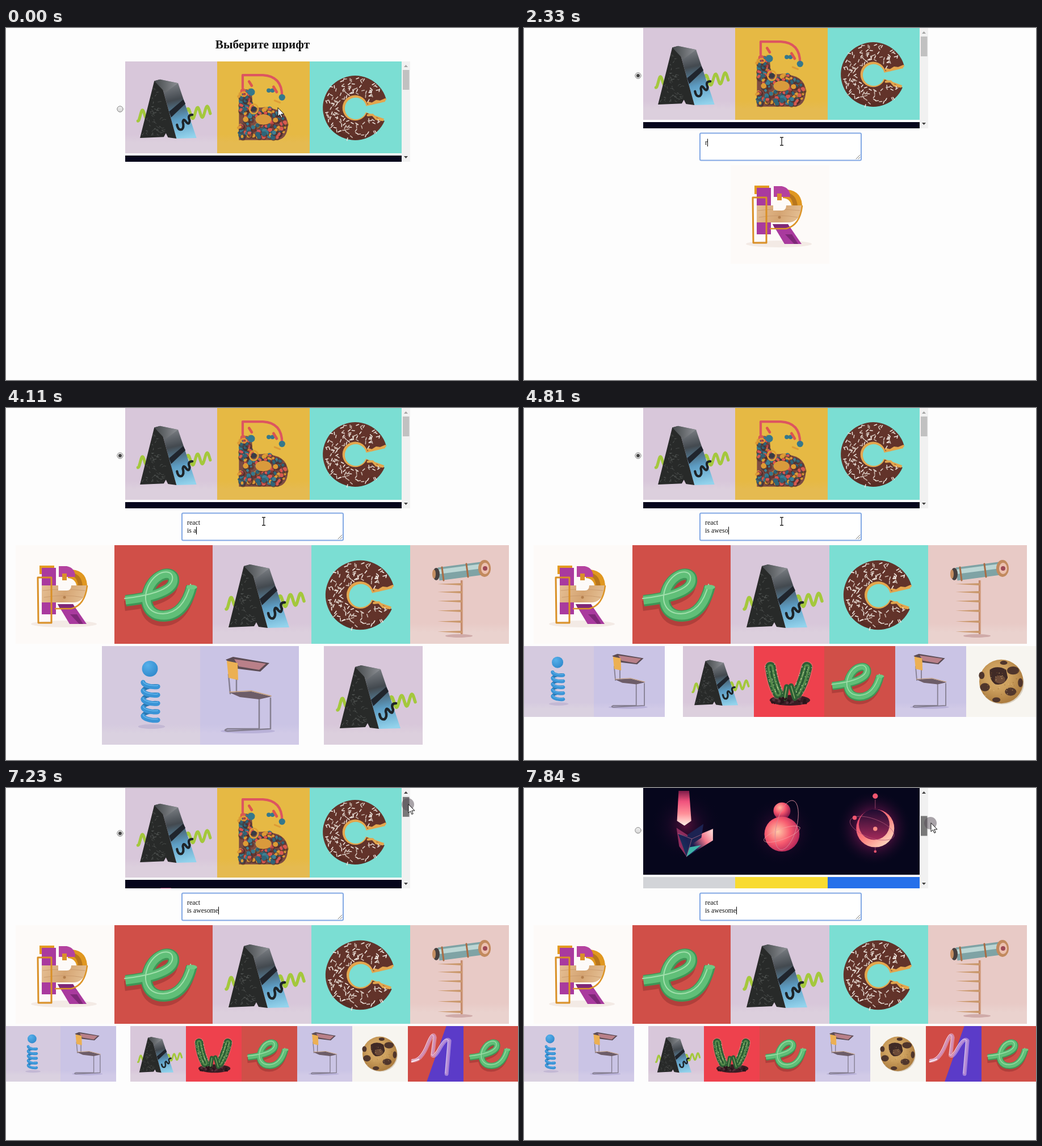
Animation of 902 by 621 pixels, one loop 8000 ms. Source, as an HTML page with a canvas:

```html
<!DOCTYPE html>
<html lang="ru">
<head>
<meta charset="utf-8">
<style>
html, body { margin: 0; width: 100%; height: 100%; overflow: hidden; background: #fdfdfd; }
canvas { display: block; }
</style>
</head>
<body>
<canvas id="stage" width="902" height="621"></canvas>
<script>
const ctx = document.getElementById('stage').getContext('2d');
const LOOP = 8000, TILE = 174;
const SERIF = '"Liberation Serif", "Times New Roman", serif';

// ---- drawing helpers ----
let seed = 1;
const rnd = () => (seed = seed * 16807 % 2147483647) / 2147483647;
const pick = list => list[Math.floor(rnd() * list.length)];

function box(x, y, w, h, color) {
  ctx.fillStyle = color;
  ctx.fillRect(x, y, w, h);
}
function shape(d, color) {
  ctx.fillStyle = color;
  ctx.fill(new Path2D(d));
}
function line(d, color, width, cap = 'round') {
  ctx.strokeStyle = color;
  ctx.lineWidth = width;
  ctx.lineCap = cap;
  ctx.lineJoin = 'round';
  ctx.stroke(new Path2D(d));
}
function shifted(dx, dy, paint) {
  ctx.save();
  ctx.translate(dx, dy);
  paint();
  ctx.restore();
}
function oval(x, y, rx, ry, color) {
  ctx.fillStyle = color;
  ctx.beginPath();
  ctx.ellipse(x, y, rx, ry, 0, 0, 7);
  ctx.fill();
}
const disc = (x, y, r, color) => oval(x, y, r, r, color);
function ring(x, y, rx, ry, tilt, color, width) {
  ctx.strokeStyle = color;
  ctx.lineWidth = width;
  ctx.beginPath();
  ctx.ellipse(x, y, rx, ry, tilt, 0, 7);
  ctx.stroke();
}
function arc(x, y, r, from, to, color, width) {
  ctx.strokeStyle = color;
  ctx.lineWidth = width;
  ctx.lineCap = 'butt';
  ctx.beginPath();
  ctx.arc(x, y, r, from, to);
  ctx.stroke();
}
function gradient(g, colors) {
  colors.forEach((c, i) => g.addColorStop(i / (colors.length - 1), c));
  return g;
}
const fade = (x0, y0, x1, y1, ...colors) => gradient(ctx.createLinearGradient(x0, y0, x1, y1), colors);
const glow = (x, y, r, ...colors) => gradient(ctx.createRadialGradient(x, y, 0, x, y, r), colors);
const wall = color => box(0, 0, TILE, TILE, color);
function room(top, floor) {
  wall(top);
  box(0, 138, TILE, 36, fade(0, 138, 0, 154, top, floor));
}
// A curve sampled from a function of 0..1
function curve(f, steps = 40) {
  let d = '';
  for (let i = 0; i <= steps; i++) d += (i ? 'L' : 'M') + f(i / steps).map(v => v.toFixed(2));
  return d;
}
const wave = (x, y, dx, dy, amp, turns, phase = 0) =>
  curve(k => [x + dx * k, y + dy * k + amp * Math.sin(phase + turns * 6.283 * k)]);

// ---- letters, each in a 174 unit square ----
const letters = {
  a() {
    room('#d8c7da', '#dccfdd');
    line(wave(24, 104, 24, -8, 9, 1.5, 1.4), '#a4c83c', 5.5);
    line(wave(114, 100, 47, -6, 10, 2.6, 3), '#a4c83c', 5.5);
    shape('M66 34L100 41L135 145L97 146Z', fade(86, 36, 112, 146, '#85888d', '#43494f', '#5d9dc4', '#93d3ec'));
    shape('M83 95L110 72L114 80L87 106Z', '#20252d');
    shape('M55 37L66 34L97 146L81 144L77 136L73 143L28 145Z', '#282a29');
    shape('M55 37L66 34L100 41L76 59Z', fade(55, 0, 100, 0, '#44484a', '#8d9095'));
    for (let i = 0; i < 45; i++) {
      const y = 50 + rnd() * 90, x = 57 - (y - 37) * .22 + rnd() * (y - 37) * .42;
      line(`M${x} ${y}l${rnd() * 8 - 4} ${rnd() * 9 - 4}l${rnd() * 5} ${rnd() * 4 - 2}`, '#6d716f99', .8);
    }
    line('M98 120Q100 131 107 129Q112 125 109 115Q110 107 115 114Q121 122 122 112Q117 101 127 101', '#1e2428', 4.5);
  },
  b() {
    room('#e6b944', '#e5ba50');
    line('M48 50V26H86Q122 28 122 66', '#dd5560', 4.5);
    shape('M41 62Q52 46 65 58L67 88Q132 82 133 120Q132 149 110 149H41Z', '#7d4c42');
    for (let i = 0; i < 280; i++) {
      const x = 43 + rnd() * 86, y = 54 + rnd() * 91;
      const bowl = y > 88 && Math.hypot((x - 95) / 35, (y - 118) / 29) < 1;
      if (!(x < 64 || bowl || (y > 130 && x < 122))) continue;
      const color = pick(['#35788c', '#3d7f93', '#2f6478', '#d85a50', '#d9534f', '#dd9b35']);
      disc(x + 1, y + 1.5, 5, '#4a2b2b88');
      if (rnd() < .5) disc(x, y, 3.5 + rnd() * 1.8, color);
      else line(`M${x} ${y}l${rnd() * 8 - 4} ${rnd() * 6 - 3}`, color, 5);
    }
    oval(87, 110, 15, 10, '#d99a3c');
    ring(69, 90, 8, 9, 0, '#dfa035', 3);
    disc(69, 90, 5, '#383c46');
    for (const [x, y, r] of [[64, 58, 7], [122, 68, 6], [97, 55, 4], [104, 55, 4]]) disc(x, y, r, '#35788c');
    line('M106 48L112 58M60 38L65 46', '#dd5550', 5);
    ring(50, 62, 5, 4, 0, '#dfa035', 2.5);
    line('M108 74L118 78', '#dd9b35', 3);
  },
  c() {
    wall('#7bded3');
    arc(87, 89, 39, .35, 6.06, '#e3a64e', 37);
    arc(86, 88, 42.5, .42, 6.0, '#62332a', 37);
    arc(86, 88, 57, .9, 2.6, '#4c241e66', 8);
    line('M110 78L118 80L126 75L134 76L143 72M110 102L119 101L126 109L138 111', '#e3a64e', 4);
    for (let i = 0; i < 130; i++) {
      const turn = .5 + rnd() * 5.4, r = 28 + rnd() * 31, dir = rnd() * 6.3;
      const x = 86 + r * Math.cos(turn), y = 88 + r * Math.sin(turn);
      line(`M${x} ${y}l${5 * Math.cos(dir)} ${5 * Math.sin(dir)}`, pick(['#efe6df', '#d9cbc3', '#c8b5aa']), 1.7);
    }
  },
  r() {
    wall('#fdfaf8');
    oval(85, 139, 58, 6, '#f3eae5');
    box(42, 36, 26, 15, '#e39b22');
    shape('M92 43H100Q127 46 126 76H108Q107 59 92 58Z', '#e09720');
    shape('M104 50Q116 54 118 72H110Q109 60 103 56Z', '#b8761c');
    box(46, 40, 25, 82, '#a93a9e');
    shape('M76 37H90Q105 40 105 56H76Z', '#b4429f');
    box(82, 50, 8, 12, '#d9902a');
    shape('M46 71H126Q124 98 104 101H46Z', fade(46, 71, 126, 101, '#e5be93', '#d5a573', '#e7c49a'));
    line('M48 80Q80 76 122 80M50 92Q86 86 118 92', '#c7966a', .8);
    disc(86, 92, 2.5, '#b47f4e');
    shape('M75 62H90Q98 63 98 71Q98 80 90 80H75Z', '#fdfaf8');
    shape('M74 104H101L125 139H95Z', '#a93a9e');
    shape('M74 104H101L105 112H78ZM96 122L108 122L119 139H112Z', '#7f2878');
    line('M70 112H98Q122 106 126 72', '#dc9427', 2.5);
    line('M39 57H63V137H40Z', '#d98f25', 3);
  },
  e() {
    wall('#d04f48');
    const d = 'M20 98C56 94 105 84 105 62C105 45 76 47 62 76C50 104 62 125 88 125C116 124 130 100 137 73';
    shifted(-2, 9, () => line(d, '#8e2d2c77', 18, 'butt'));
    line(d, '#3f9757', 20, 'butt');
    shifted(-.5, -1, () => line(d, '#60bf78', 15, 'butt'));
    shifted(-2, -4, () => line(d, '#a0dfab', 2));
    oval(137, 74, 9.5, 4, '#6fca84');
  },
  t() {
    room('#e8cac6', '#ead2ce');
    oval(86, 160, 24, 3, '#cfaaa8');
    line('M91 62V157', '#c08567', 4, 'butt');
    line('M92 62V157', '#e3b9a0', 1, 'butt');
    for (const y of [69, 83, 99, 116, 135, 153]) shape(`M48 ${y - .5}L91 ${y - 2}V${y + 2}Z`, '#c9976a');
    line('M50 51L126 41', '#7fa3a5', 23, 'butt');
    line('M50 47L126 37', '#bcd6d4', 8, 'butt');
    line('M56 39L59 62M99 33L102 56', '#a96c45', 3);
    oval(46, 51, 6, 11, '#48403f');
    oval(42, 51, 3, 8, '#c58f62');
    oval(131, 41, 11, 15, '#c28a5e');
    oval(132, 41, 7, 10, '#ecc0ae');
    disc(132, 41, 4, '#9d4a56');
  },
  i() {
    room('#d5cadf', '#dad1e0');
    oval(88, 142, 24, 4, '#c3b8d4');
    const coil = half => curve(k => {
      const turn = half * Math.PI + k * Math.PI;
      return [86 - 13 * Math.cos(turn), 64 + turn * 2.35 + 3.5 * Math.sin(turn)];
    }, 16);
    for (let h = 1; h < 9; h += 2) line(coil(h), '#2a76b0', 7);
    for (let h = 0; h < 10; h += 2) line(coil(h), '#3a94d6', 8.5);
    for (let h = 0; h < 10; h += 2) shifted(0, -2, () => line(coil(h), '#66b6ec', 1.5));
    disc(85, 40, 14, glow(81, 34, 20, '#57b0ea', '#338cce'));
  },
  s() {
    room('#cac4e5', '#d1cae7');
    oval(84, 150, 48, 4, '#b9b1d8');
    line('M64 36V84M50 50L53 84M124 92V146L48 150Q40 149 48 146H104V92', '#857f91', 2.5);
    shape('M45 24L58 19L122 30L106 45L66 40Z', '#5c4c55');
    shape('M60 23L116 31L104 42L68 36Z', '#b98089');
    shape('M47 26L66 30L67 60L50 56Z', '#ecb053');
    shape('M52 82L90 80L126 89L104 94L70 90Z', '#6d5d68');
    line('M52 81L90 79L125 88', '#caa27a', 1.5);
  },
  w() {
    wall('#ee414d');
    oval(89, 133, 50, 13, '#3a1d24');
    for (const [d, lean] of [['M41 52Q46 92 60 116', .28], ['M131 52Q122 92 106 116', -.36]]) {
      line(d, '#d99a8f66', 30);
      line(d, '#2d5f35', 26);
      line(d, '#568c4c', 15);
      line(d, '#2a5a33', 5);
      const x = lean > 0 ? 41 : 131;
      for (let i = 0; i < 45; i++) {
        const y = 44 + rnd() * 72;
        disc(x + (y - 52) * lean + (Math.floor(rnd() * 4) - 1.5) * 8, y, 1, '#d6dcae');
      }
    }
    line('M76 128L81 100M92 98L101 128', '#2d5f35', 13);
    line('M76 128L81 100M92 98L101 128', '#8fb36c', 2);
    for (let i = 0; i < 30; i++) disc(45 + rnd() * 88, 128 + rnd() * 13, 2 + rnd() * 2, pick(['#2a151b', '#54303a']));
  },
  o() {
    wall('#f7f5f0');
    oval(88, 92, 54, 51, '#d9cfc0');
    disc(86, 87, 54, glow(78, 76, 62, '#d8ae6e', '#cda05e', '#ae7f42'));
    for (const [x, y, rx, ry] of [[115, 60, 15, 10], [46, 101, 12, 10], [109, 112, 14, 10], [74, 132, 10, 6], [92, 41, 9, 5], [38, 72, 7, 9], [133, 90, 6, 11]])
      oval(x, y, rx, ry, '#50362c');
    shape('M58 58Q76 46 98 58L102 78Q92 98 72 94Q56 84 58 58Z', '#402a26');
    oval(83, 82, 13, 10, '#6d4b38');
    for (let i = 0; i < 50; i++) disc(42 + rnd() * 86, 52 + rnd() * 70, 1.2, pick(['#8c602f88', '#edca8c88']));
  },
  m() {
    wall('#d04b45');
    shape('M120 0H174V174H59Z', '#5b3bc8');
    const d = 'M16 108Q42 108 62 58Q80 14 84 36L77 92Q84 100 102 66Q122 34 130 46L121 150';
    line(d, '#efd7f077', 12);
    line(d, '#b56bc077', 7);
    line(d, '#fff4', 2.5);
    shifted(-4, -2, () => line(d, '#fffc', 1.5));
    line('M12 112L34 104', '#f8e6ee', 4);
  }
};

const night = [
  () => {
    disc(80, 80, 68, glow(80, 80, 68, '#7a1448aa', '#2a0a3055', '#06061c00'));
    shape('M67 15H87L91 72L78 81L64 72Z', fade(0, 12, 0, 81, '#6b1440', '#f0527d', '#ff8f98', '#fff0e6'));
    shape('M63 85L92 104L82 140L68 120Z', '#8d2c5c');
    shape('M66 96L92 104L132 87V109L82 140Z', fade(75, 130, 132, 90, '#17345e', '#1a1c50', '#f2768b', '#ffe4de'));
    shape('M82 140L88 122L110 118Z', '#3fb3a9');
    shape('M84 98L114 78L110 104L84 122Z', '#1c2352');
    line('M66 96L92 106L132 88M92 106L82 140', '#ff8d9d88', 1);
  },
  () => {
    disc(86, 92, 66, glow(86, 92, 66, '#a01a54aa', '#3a0c3655', '#06061c00'));
    disc(88, 53, 16, glow(84, 47, 22, '#ffb79d', '#f5546d', '#8c1a4c'));
    disc(88, 97, 33, glow(80, 92, 46, '#ffc9a7', '#f85c70', '#a81d55'));
    ring(97, 80, 19, 48, .25, '#d8879a', 1);
    ring(88, 97, 36, 10, -.35, '#f5a2a4', .8);
  },
  () => {
    disc(88, 86, 72, glow(88, 86, 72, '#c92b66', '#5a1245aa', '#06061c00'));
    disc(90, 86, 36, fade(60, 60, 110, 122, '#e23d6c', '#fb7f7d', '#ffdcc2'));
    disc(88, 79, 29, fade(0, 50, 0, 108, '#1d0b30', '#a52a5a'));
    ring(84, 86, 44, 18, .35, '#b5587a', .8);
    disc(90, 87, 4, '#ff8d86');
    disc(90, 25, 5, '#f0566f');
    disc(51, 66, 4, '#f0566f');
    disc(90, 130, 2.5, '#f0566f');
    line('M90 32V48M90 122V128', '#b5587a', .8);
  }
].map(art => () => { wall('#06061c'); art(); });

const plain = ['#d2d4d8', '#f8db30', '#2670ea'].map(c => () => wall(c));
const menu = [[letters.a, letters.b, letters.c], night, plain];

// Edges snap to whole pixels so that neighbours meet without a seam
function tile(art, x, y, size) {
  const left = Math.round(x), top = Math.round(y);
  const w = Math.round(x + size) - left, h = Math.round(y + size) - top;
  seed = 91733;
  ctx.save();
  ctx.translate(left, top);
  ctx.scale(w / TILE, h / TILE);
  ctx.beginPath();
  ctx.rect(0, 0, TILE, TILE);
  ctx.clip();
  art();
  ctx.restore();
}

// ---- timing ----
const TEXT = 'react\nis awesome';
const KEYS = [2330, 2410, 2490, 2640, 2810, 3340, 3570, 3880, 3960, 4110, 4280, 4430, 4660, 4810, 4980, 5060];
const within = (t, from, to) => t >= from && t < to;
// Stepped progress 0..1: first of n steps at `from`, last at `to`
const glide = (t, from, to, n) =>
  t < from ? 0 : Math.min(1, (Math.floor((t - from) / (to - from) * (n - 1) + 1e-6) + 1) / n);
const mix = (a, b, k) => a + (b - a) * k;

function pointer(t) {
  if (t < 80) return [479, 141];
  if (t < 1710) {
    const k = glide(t, 1240, 1560, 5);
    return [mix(478, 458, k), mix(137, 203, k)];
  }
  if (t < 6840) {
    const k = glide(t, 5990, 6770, 11);
    return [mix(454, 711, k), mix(200, 28, k)];
  }
  if (t < 6920) return [709, 27];
  const k = glide(t, 7300, 7840, 9);
  return [mix(709, 717, k), mix(29, 62, k)];
}

// ---- page parts ----
function radio(y, checked) {
  disc(201, y, 5.5, fade(0, y - 5, 0, y + 5, '#eeeeee', '#d6d6d6'));
  ring(201, y, 5.2, 5.2, 0, '#8d8d8d', 1);
  if (checked) disc(201, y, 3, '#444');
}

function picker(top, t, x, y) {
  const scroll = t < 7150 ? 0 : mix(4, 175.5, glide(t, 7300, 7840, 9));
  const size = 162.4, pitch = 166.2;
  ctx.save();
  ctx.beginPath();
  ctx.rect(190, top, 525, 177);
  ctx.clip();
  menu.forEach((row, r) => {
    const rowTop = top + r * pitch - scroll;
    if (rowTop > top + 177 || rowTop < top - size) return;
    row.forEach((art, c) => tile(art, 210 + c * size, rowTop, size));
    radio(rowTop + 84, r === 0 && t >= 540);
  });
  box(697, top, 15, 177, '#f1f1f1');
  const thumb = top + 15 + scroll * .196;
  const over = x > 697 && x < 712 && y > thumb && y < thumb + 36;
  box(699, thumb, 11.5, 35, t >= 7070 ? '#787878' : over ? '#a8a8a8' : '#c1c1c1');
  shape(`M701 ${top + 10}h7l-3.5 -4z`, scroll ? '#404040' : '#a3a3a3');
  shape(`M701 ${top + 167}h7l-3.5 4z`, '#404040');
  ctx.restore();
}

function textarea(lines, t) {
  const focused = t >= 1560;
  ctx.beginPath();
  ctx.roundRect(310, 185.5, 284, 48, 2);
  ctx.fillStyle = '#fff';
  ctx.fill();
  ctx.strokeStyle = focused ? '#82a8e4' : '#a9a9a9';
  ctx.lineWidth = focused ? 2 : 1;
  ctx.stroke();
  line('M585 231L592 224M589 231L592 228', '#777', 1);
  ctx.fillStyle = '#111';
  ctx.font = '11.9px ' + SERIF;
  ctx.textAlign = 'left';
  lines.forEach((s, i) => ctx.fillText(s, 319, 206 + i * 14));
  const last = lines.length - 1;
  const caret = within(t, 1560, 2030) || within(t, 2330, 5590) || within(t, 6090, 6590) || t >= 7090;
  if (caret) box(Math.round(319 + ctx.measureText(lines[last]).width), 195.5 + last * 14, 1, 13.5, '#000');
}

// Letters shrink together once a line outgrows the page
function word(s, y) {
  const units = [...s].map(ch => ch === ' ' ? .253 : 1);
  const total = units.reduce((a, b) => a + b, 0);
  const size = Math.min(173.8, 906 / total);
  let x = 451.2 - total * size / 2;
  [...s].forEach((ch, i) => {
    if (ch !== ' ') tile(letters[ch], x, y, size);
    x += units[i] * size;
  });
}

function cursor(x, y, t) {
  if (within(t, 540, 710) || t >= 7070) disc(x - 1, y, 11, 'rgba(85,75,85,.5)');
  if (t >= 710 && within(x, 310, 595) && within(y, 185, 235)) {
    const beam = `M${x - 3} ${y - 7}h2.5l.5 1l.5 -1h2.5M${x} ${y - 6}v12M${x - 3} ${y + 7}h2.5l.5 -1l.5 1h2.5`;
    line(beam, '#222', 1.3, 'butt');
    return;
  }
  const arrow = `M${x} ${y}v15l3.5 -3.2l2.4 5.6l2.3 -1l-2.4 -5.4h4.8z`;
  shape(arrow, '#fff');
  line(arrow, '#111', 1);
}

function draw(t) {
  const [x, y] = pointer(t);
  const open = t >= 710;
  box(0, 0, 902, 621, '#fdfdfd');
  if (!open) {
    ctx.fillStyle = '#111';
    ctx.font = 'bold 21.2px ' + SERIF;
    ctx.textAlign = 'center';
    ctx.fillText('Выберите шрифт', 452, 36);
  }
  picker(open ? 0 : 59, t, x, y);
  if (open) {
    const lines = TEXT.slice(0, KEYS.filter(k => k <= t).length).split('\n');
    textarea(lines, t);
    lines.forEach((s, i) => word(s, 242 + i * 178));
  }
  cursor(x, y, t);
}

const start = performance.now();
function tick() {
  draw((performance.now() - start) % LOOP);
  requestAnimationFrame(tick);
}
tick();
</script>
</body>
</html>
```
